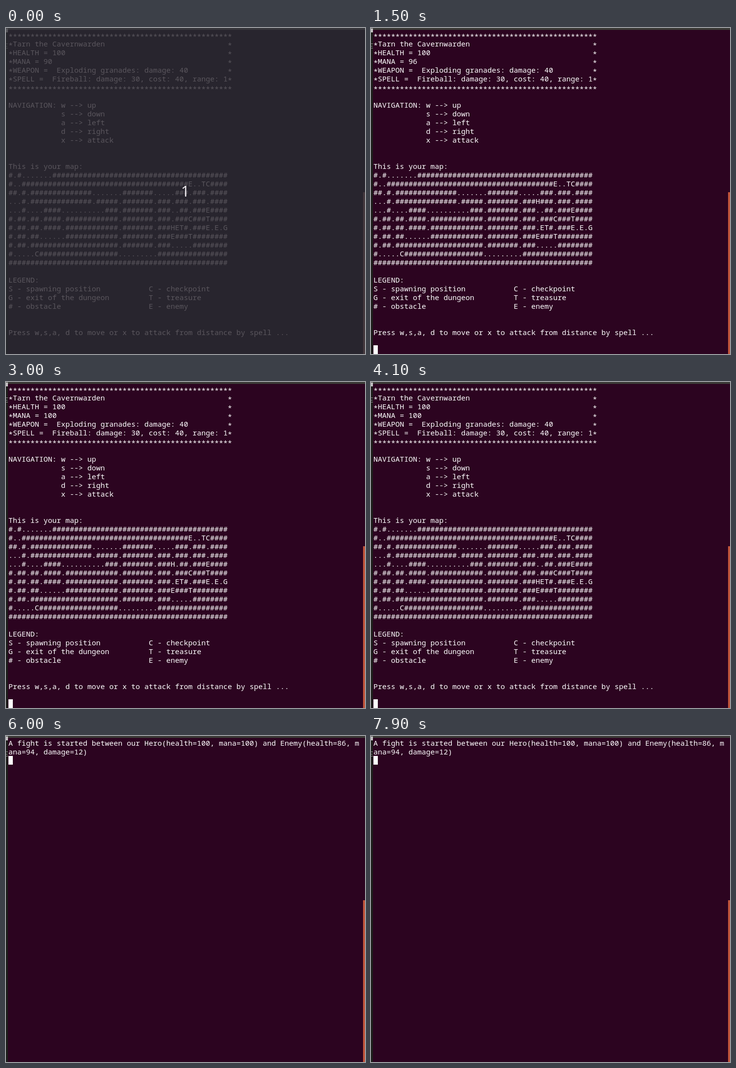
An HTML page for the animation above (8 s loop, 737 by 671 pixels).

```html
<!DOCTYPE html>
<html lang="en">
<head>
<meta charset="utf-8">
<title>Dungeon terminal</title>
<style>
  html, body { margin: 0; width: 100%; height: 100%; overflow: hidden; background: #2c0420; }
  svg { display: block; width: 737px; height: 671px;
    --bg: #2c0420; --ink: #fff; --frame: #3b3a36; --edge: #1d1d1b; --scroll: #c0543a; --mark: #c4c2c4; }
  svg.dim { --bg: #28252e; --ink: #5a565d; --frame: #36363b; --edge: #26272c; --scroll: #43383d; --mark: #55555a; }
  .line { font: 15px "Noto Sans Mono", "DejaVu Sans Mono", monospace; white-space: pre; fill: var(--ink); }
  #count { font: 31px "Open Sans", "Noto Sans", sans-serif; text-anchor: middle; fill: #f0ecf0; }
</style>
</head>
<body>
<svg id="stage" viewBox="0 0 737 671">
  <rect width="737" height="671" fill="var(--bg)"/>
  <rect width="4" height="671" fill="var(--edge)"/>
  <rect width="737" height="4" fill="var(--frame)"/>
  <rect y="1" width="4" height="8" fill="var(--mark)"/>
  <path d="M0 32.5H4M0 37.5H3M0 41.5H4" stroke="var(--mark)" opacity=".7"/>
  <rect x="733" y="338" width="4" height="333" fill="var(--scroll)"/>
  <g id="rows"></g>
  <rect id="cursor" x="5" width="9" height="18" fill="#fff"/>
  <text id="count" x="368" y="347">1</text>
</svg>
<script>
const LOOP = 8000, CELL = 9, ROW = 18, LEFT = 5, TOP = 5, ROWS = 37;
const DIM_END = 300, FIGHT_START = 4300;
const BLINKS = [300, 900, 1000, 2400, 2800, 4000, 4100, 4300, 4900, 6000, 6100, 6700, 7300, 7900];
const HERO_COL = 37, MAP_ROW = 16;

// [time, hero's map row, mana]
const MOVES = [
  [0, 6, 90], [1200, 5, 92], [1400, 4, 94], [1500, 3, 96], [1800, 2, 98],
  [2000, 3, 100], [3000, 4, 100], [3400, 5, 100], [3500, 6, 100]
];

const wall = n => "#".repeat(n);
const MAP = [
  "#.#......." + wall(40),
  "#.." + wall(38) + "E..TC####",
  "##.#." + wall(14) + ".......#######.....###.###.####",
  "...#." + wall(14) + ".#####.#######.###.###.###.####",
  "...#....####..........###.#######.###..##.###E####",
  "#.##.##.####." + wall(12) + ".#######.###.###C###T####",
  "#.##.##.####." + wall(12) + ".#######.###.ET#.###E.E.G",
  "#.##.##......" + wall(12) + ".#######.###E###T########",
  "#.##." + wall(20) + ".#######.###.....########",
  "#.....C" + wall(18) + "........." + wall(16),
  wall(50)
];

const FIGHT = [
  "A fight is started between our Hero(health=100, mana=100) and Enemy(health=86, m",
  "ana=94, damage=12)"
];

const byId = id => document.getElementById(id);
const stage = byId("stage"), cursor = byId("cursor"), count = byId("count");

function addLine(y) {
  const line = document.createElementNS("http://www.w3.org/2000/svg", "text");
  line.setAttribute("class", "line");
  line.setAttribute("x", LEFT);
  line.setAttribute("y", y);
  byId("rows").append(line);
  return line;
}

// Asterisks sit lower than the font's default, so they get their own layer.
const lines = Array.from({ length: ROWS }, (_, i) => {
  const baseline = TOP + i * ROW + 15;
  return { text: addLine(baseline), stars: addLine(baseline + 3) };
});

const boxed = s => "*" + s.padEnd(49) + "*";
const legend = (a, b) => a.padEnd(32) + b;

function dungeon(heroRow, mana) {
  const map = MAP.map((row, i) =>
    i === heroRow ? row.slice(0, HERO_COL) + "H" + row.slice(HERO_COL + 1) : row);
  const border = "*".repeat(51), indent = " ".repeat(12);
  return [
    border,
    boxed("Tarn the Cavernwarden"),
    boxed("HEALTH = 100"),
    boxed("MANA = " + mana),
    boxed("WEAPON =  Exploding granades: damage: 40"),
    boxed("SPELL =  Fireball: damage: 30, cost: 40, range: 1"),
    border,
    "",
    "NAVIGATION: w --> up",
    indent + "s --> down",
    indent + "a --> left",
    indent + "d --> right",
    indent + "x --> attack",
    "", "",
    "This is your map:",
    ...map,
    "",
    "LEGEND:",
    legend("S - spawning position", "C - checkpoint"),
    legend("G - exit of the dungeon", "T - treasure"),
    legend("# - obstacle", "E - enemy"),
    "", "",
    "Press w,s,a, d to move or x to attack from distance by spell ..."
  ];
}

let shown = "";
function show(content) {
  const key = content.join("\n");
  if (key === shown) return;
  shown = key;
  lines.forEach(({ text, stars }, i) => {
    const s = content[i] || "";
    text.textContent = s.replace(/\*/g, " ");
    stars.textContent = s.includes("*") ? s.replace(/[^*]/g, " ") : "";
  });
}

function render(t) {
  const dim = t < DIM_END, fighting = t >= FIGHT_START;
  const [, heroRow, mana] = MOVES.filter(m => m[0] <= t).pop();
  show(fighting ? FIGHT : dungeon(heroRow, mana));

  stage.classList.toggle("dim", dim);
  count.style.display = dim ? "" : "none";

  const cursorOn = BLINKS.filter(b => b <= t).length % 2 === 1 || (fighting && t < 4900);
  cursor.setAttribute("y", TOP + ROW * (fighting ? 2 : 36));
  cursor.style.display = cursorOn && !dim ? "" : "none";
}

// The screen clears at FIGHT_START while the cursor stays lit.
BLINKS.splice(BLINKS.indexOf(FIGHT_START), 1);

const start = performance.now();
function tick() {
  render((performance.now() - start) % LOOP);
  requestAnimationFrame(tick);
}
render(0);
requestAnimationFrame(tick);
</script>
</body>
</html>
```
